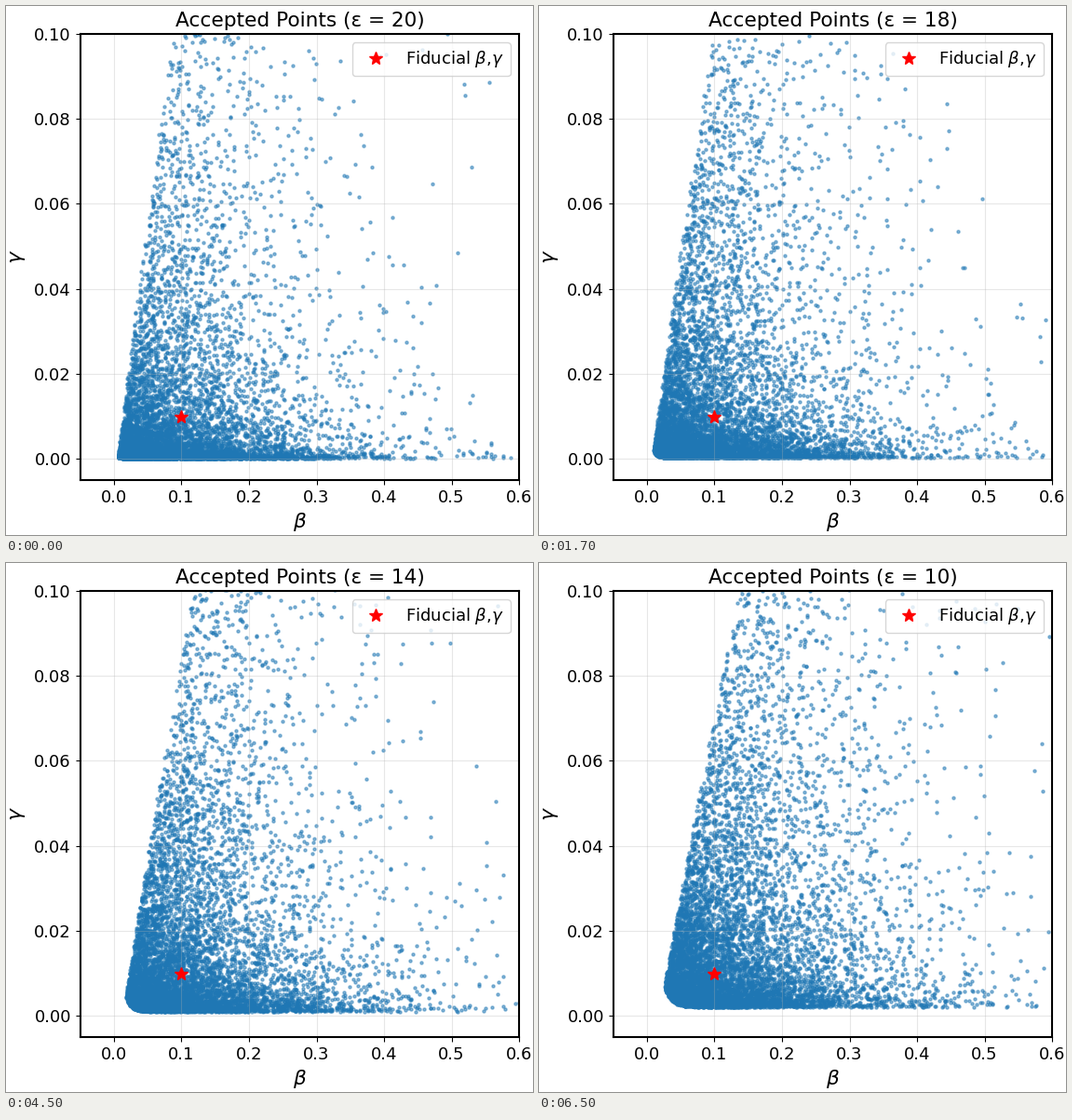
Recreate the animation shown at these times as a matplotlib script. Size 566 by 568 pixels, loop 8 s.

```python
import numpy as np
import matplotlib.pyplot as plt
from matplotlib.animation import FuncAnimation

WIDTH, HEIGHT, DPI = 566, 568, 100
INTERVAL = 500
FRAMES = 16
GAMMA_TOP = 0.101
EPSILONS = (20, 18, 16, 14, 10)


def accepted_points(epsilon):
    """Draw from the prior and keep what a tolerance of epsilon accepts."""
    rng = np.random.default_rng(epsilon)
    tight = (20 - epsilon) / 10
    floor = 0.0001 + 0.0019 * tight**1.5
    span = np.log(GAMMA_TOP / floor)
    count = int((1550 + 1900 * tight) * span)
    beta = rng.exponential(0.09 + 0.012 * tight, count)
    gamma = floor * np.exp(rng.uniform(0, span, count))

    # Slanted left edge, and a floor that rises into a rounded corner
    start = 0.006 + 0.0125 * tight
    left = start + (0.72 + 0.36 * tight) * gamma + gamma**2
    rise = 0.0003 + 0.0095 * tight
    bottom = floor + rise * np.exp((start - beta) / (0.003 + 0.007 * tight))
    keep = (beta > left) & (gamma > bottom)
    return np.column_stack([beta, gamma])[keep]


clouds = [accepted_points(epsilon) for epsilon in EPSILONS]

plt.rcParams.update({
    "font.family": "DejaVu Sans",
    "font.size": 13,
    "axes.linewidth": 1.5,
})
fig = plt.figure(figsize=((WIDTH + 1e-6) / DPI, (HEIGHT + 1e-6) / DPI), dpi=DPI)
ax = fig.add_axes([79.68 / WIDTH, 59 / HEIGHT, 471.43 / WIDTH, 479 / HEIGHT])
ax.set_xlim(-0.05, 0.6)
ax.set_ylim(-0.005, 0.1)
ax.set_xticks(np.arange(7) / 10)
ax.set_yticks(np.arange(6) / 50)
ax.grid(alpha=0.3)

dots = ax.scatter([], [], s=5, alpha=0.5, color="C0")
ax.plot(0.1, 0.01, "r*", markersize=10, linestyle="none",
        label=r"Fiducial $\beta$,$\gamma$")
ax.legend(loc="upper right")
title = ax.set_title("")


def axis_label(x, y, text, rotation=0):
    fig.text(x / WIDTH, 1 - y / HEIGHT, text, fontsize=15.6,
             ha="center", va="center", rotation=rotation)


axis_label(315.5, 553.5, r"$\beta$")
axis_label(13, 269.5, r"$\gamma$", rotation=90)


def update(frame):
    # The first stage shows for one frame, the others for four
    stage = (frame + 3) // 4
    dots.set_offsets(clouds[stage])
    title.set_text(f"Accepted Points (ε = {EPSILONS[stage]})")
    return dots, title


anim = FuncAnimation(fig, update, frames=FRAMES, interval=INTERVAL,
                     repeat=True, repeat_delay=0)
plt.show()
```
